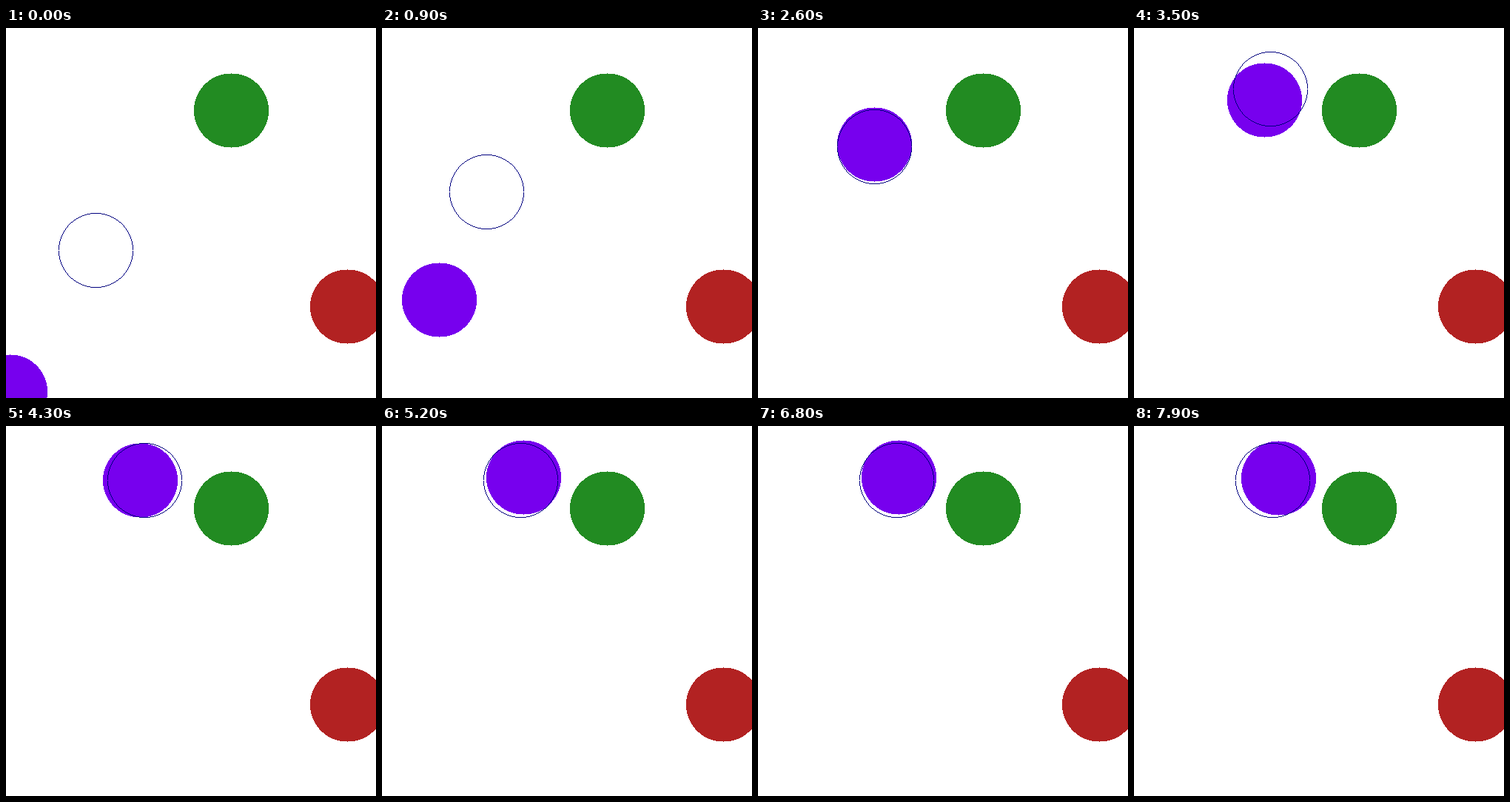
An HTML page with a canvas for the animation above (8000 ms loop, 500x500 px).

```html
<!DOCTYPE html>
<html lang="en">
<head>
<meta charset="utf-8">
<title>Circles</title>
<style>
html, body { margin: 0; width: 100%; height: 100%; overflow: hidden; background: #fff; }
canvas { display: block; }
</style>
</head>
<body>
<canvas width="500" height="500"></canvas>
<script>
const LOOP = 8000, STEP = 100, SPAN = 900, R = 50;
const ctx = document.querySelector("canvas").getContext("2d");

// Ball positions, one per SPAN; the last one is where it settles
const path = [[5, 491], [77, 367], [117, 277], [161, 146], [177, 93], [182, 70], [193, 69]];
const SETTLED = SPAN * (path.length - 1);

// Ring positions, one per second
const stops = [[121, 300], [141, 221], [157, 160], [184, 82], [187, 73]];

const at = (list, i) => list[Math.min(Math.max(i, 0), list.length - 1)];
const chord = y => Math.round(Math.sqrt(R * R - y * y));

// Catmull-Rom curve through the path, then a slow sideways swing
function ballAt(t) {
  if (t >= SETTLED) {
    const s = t - SETTLED, [x, y] = path.at(-1);
    return [x + 6 * Math.sin(s / 2400 * 2 * Math.PI), y + s / 3000];
  }
  const i = Math.floor(t / SPAN), u = t / SPAN - i;
  return [0, 1].map(k => {
    const [a, b, c, d] = [-1, 0, 1, 2].map(n => at(path, i + n)[k]);
    return b + u / 2 * (c - a + u * (2 * a - 5 * b + 4 * c - d + u * (3 * (b - c) + d - a)));
  });
}

// Hard-edged disc, row by row
function disc([x, y], color) {
  ctx.fillStyle = color;
  for (let dy = -R; dy <= R; dy++) {
    const w = chord(dy);
    ctx.fillRect(Math.round(x) - w, Math.round(y) + dy, 2 * w + 1, 1);
  }
}

// One-pixel circle, open at its leftmost and rightmost points
function ring([x, y], color) {
  ctx.fillStyle = color;
  for (let a = 0; a <= R * Math.SQRT1_2; a++) {
    const b = chord(a);
    for (const sx of [-1, 1]) for (const sy of [-1, 1]) {
      ctx.fillRect(x + sx * a, y + sy * b, 1, 1);
      if (a) ctx.fillRect(x + sx * b, y + sy * a, 1, 1);
    }
  }
}

function draw() {
  const t = Math.floor(performance.now() % LOOP / STEP) * STEP;
  ctx.clearRect(0, 0, 500, 500);
  disc([304, 111], "forestgreen");
  disc([461, 376], "firebrick");
  disc(ballAt(t), "#7700ee");
  ring(at(stops, Math.floor((t + 200) / 1000)), "navy");
  requestAnimationFrame(draw);
}
draw();
</script>
</body>
</html>
```
